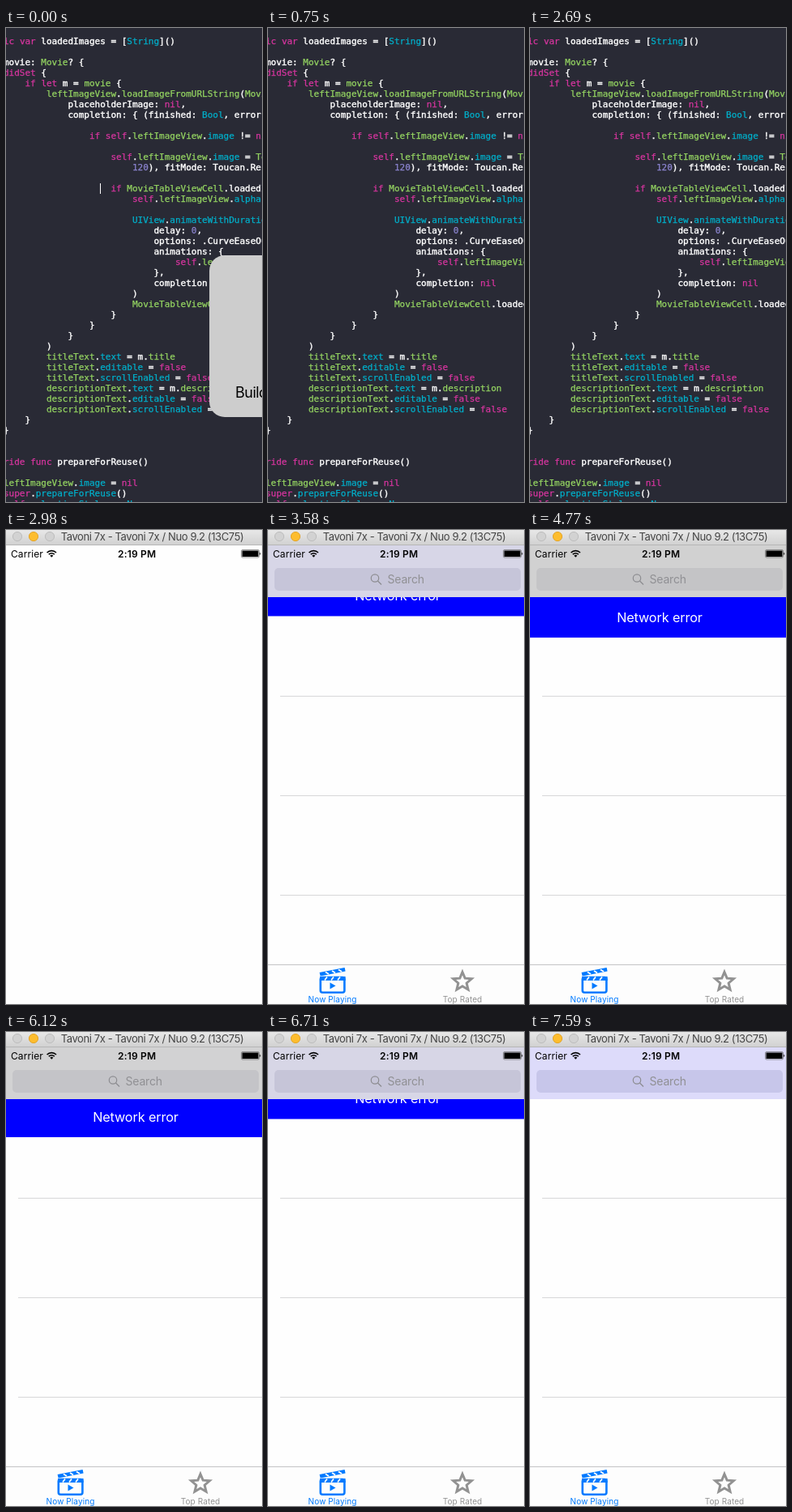
Write an HTML page that moves like this. It is 316x586 px and loops after 8 s.

```html
<!DOCTYPE html>
<html lang="en">
<head>
<meta charset="utf-8">
<title>Network error banner</title>
<style>
html, body { margin: 0; width: 100%; height: 100%; overflow: hidden; background: #292a35; }
#stage { position: relative; width: 316px; height: 586px; overflow: hidden; }
#stage > * { position: absolute; }
#code {
  left: -3px; top: 10px; margin: 0; color: #fff; white-space: pre;
  font: 11px/13px "DejaVu Sans Mono", monospace; -webkit-text-stroke: .4px;
}
#code span { -webkit-text-stroke: .25px; }
.key { color: #d7359f; }
.own { color: #95d562; }
.lib { color: #00afca; }
.num { color: #8b84cf; }
#cursor { left: 116px; top: 192px; width: 1px; height: 13px; background: #fff; }
#hud {
  left: 251px; top: 281px; width: 200px; height: 200px; border-radius: 19px; background: #cdcdcd;
  font: 18px/22px Inter, sans-serif; letter-spacing: -.5px; color: #000; text-align: center;
}
#hud span { position: absolute; left: 0; right: 0; top: 159px; }
#phone { left: 0; top: 0; font-family: Inter, sans-serif; }
</style>
</head>
<body>
<div id="stage">
  <pre id="code"></pre>
  <div id="cursor"></div>
  <div id="hud"><span>Build Succeeded</span></div>
  <svg id="phone" width="316" height="586" viewBox="0 0 316 586">
    <defs>
      <linearGradient id="chrome" x2="0" y2="1">
        <stop stop-color="#e8e8e8"/><stop offset="1" stop-color="#d0d0d0"/>
      </linearGradient>
    </defs>
    <rect width="316" height="586" fill="#fefefe"/>

    <g id="app">
      <path d="M15 205.5H316M15 328.5H316M15 451.5H316" stroke="#d7d7d9"/>
      <g id="banner">
        <rect y="83" width="316" height="50" fill="#00f"/>
        <text x="160" y="113.7" font-size="16.2" letter-spacing="-.1" text-anchor="middle" fill="#fff">Network error</text>
      </g>
      <rect id="bar" y="19" width="316" height="64"/>
      <rect id="field" x="8" y="47" width="304" height="28" rx="5"/>
      <g fill="none" stroke="#8c8c90" stroke-width="1.2">
        <circle cx="132" cy="59.5" r="4.7"/><path d="M135.5 63l4.5 4.5"/>
      </g>
      <text x="147.5" y="66" font-size="14" letter-spacing="-.2" fill="#909094">Search</text>

      <rect y="537" width="316" height="49" fill="#fdfdfd"/>
      <path d="M0 537.5H316" stroke="#c4c4c6"/>
      <g fill="#007aff">
        <rect x="64.8" y="553" width="29.6" height="18.8" rx="2.5" fill="none" stroke="#007aff" stroke-width="2.6"/>
        <path d="M64 552h31.6v5H64zM63.6 547l31-6 1 4.6-31 6zM76.5 559.5v8l7-4z"/>
        <path d="M71 546.5l4 2.6M79 545l4 2.6M87 543.4l4 2.6M73 552.5l-3 4M81 552.5l-3 4M89 552.5l-3 4" stroke="#fdfdfd" stroke-width="1.8"/>
        <text x="79.5" y="583.6" font-size="10" letter-spacing=".1" text-anchor="middle">Now Playing</text>
      </g>
      <path id="star" fill="none" stroke="#929292" stroke-width="3" stroke-miterlimit="8"/>
      <text x="240" y="583.6" font-size="10" letter-spacing=".1" text-anchor="middle" fill="#929292">Top Rated</text>
    </g>

    <rect width="316" height="19" fill="url(#chrome)"/>
    <path d="M0 18.5H316" stroke="#b6b6b6"/>
    <g stroke="#bdbdbd" fill="#d2d2d2">
      <circle cx="14" cy="8" r="5.6"/><circle cx="54" cy="8" r="5.6"/>
      <circle cx="34" cy="8" r="5.6" fill="#fdbd2e" stroke="#e2a52c"/>
    </g>
    <text x="180.5" y="13" font-size="13" letter-spacing="-.4" text-anchor="middle" fill="#444">Tavoni 7x - Tavoni 7x / Nuo 9.2 (13C75)</text>

    <text x="6" y="33.5" font-size="12" letter-spacing=".1">Carrier</text>
    <g fill="none" stroke="#000" stroke-width="1.7">
      <path d="M50.6 28a8 8 0 0 1 11.4 0M52.8 30.2a5 5 0 0 1 7 0"/>
      <path d="M56.3 33.8l-2-2.1a2.9 2.9 0 0 1 4 0z" fill="#000" stroke="none"/>
    </g>
    <text x="161.7" y="33.5" font-size="12" font-weight="600" letter-spacing=".2" text-anchor="middle">2:19 PM</text>
    <rect x="290.5" y="24.5" width="22" height="9.5" rx="1.5" fill="none" stroke="#666" stroke-width=".7"/>
    <path d="M291.5 25.5h20v7.5h-20zM313.3 27.5q2 1.8 0 3.6z"/>
  </svg>
</div>

<script>
const LOOP = 8000, TICK = 149;
const $ = id => document.getElementById(id);

// Each line: indent, then text.
const lines = `0 ic var loadedImages = [String]()

0 movie: Movie? {
0 didSet {
4 if let m = movie {
8 leftImageView.loadImageFromURLString(Movie
12 placeholderImage: nil,
12 completion: { (finished: Bool, error

16 if self.leftImageView.image != nil

20 self.leftImageView.image = Toucan
24 120), fitMode: Toucan.Resize

20 if MovieTableViewCell.loadedImages
24 self.leftImageView.alpha

24 UIView.animateWithDuration
28 delay: 0,
28 options: .CurveEaseOut
28 animations: {
32 self.leftImageView
28 },
28 completion: nil
24 )
24 MovieTableViewCell.loadedImages
20 }
16 }
12 }
8 )
8 titleText.text = m.title
8 titleText.editable = false
8 titleText.scrollEnabled = false
8 descriptionText.text = m.description
8 descriptionText.editable = false
8 descriptionText.scrollEnabled = false
4 }
0 }


0 ride func prepareForReuse()

0 leftImageView.image = nil
0 super.prepareForReuse()
0 self.selectionStyle = .None`;

const syntax = {
  key: /^(ic|var|didSet|if|let|self|nil|false|ride|func|super)$/,
  own: /^(Movie\w*|movie|leftImageView|loadImage\w+|Toucan|titleText|descriptionText|title|description)$/,
  lib: /^(String|Bool|image|alpha|UIView|animateWithDuration|text|editable|scrollEnabled|prepareForReuse|selectionStyle|None)$/,
  num: /^\d+$/
};

function paint(line) {
  const [, indent = 0, text = ''] = line.match(/^(\d+) (.*)$/) || [];
  const colored = text.replace(/(?<!func |fitMode: )\b\w+\b(?!:)/g, word => {
    const kind = Object.keys(syntax).find(k => syntax[k].test(word));
    return kind ? `<span class="${kind}">${word}</span>` : word;
  });
  return ' '.repeat(indent) + colored;
}
$('code').innerHTML = lines.split('\n').map(paint).join('\n');

$('star').setAttribute('d', 'M' + Array.from({ length: 10 }, (_, i) => {
  const r = i % 2 ? 5.4 : 12, a = i * Math.PI / 5;
  return [240 + r * Math.sin(a), 558.5 - r * Math.cos(a)].map(n => n.toFixed(2));
}).join('L') + 'Z');

// Steps are [tick, value, easing to the next step].
const animations = [];
function animate(id, prop, steps) {
  const all = [[0, steps[0][1]], ...steps, [LOOP / TICK, steps.at(-1)[1]]];
  const frames = all.map(([tick, value, easing = 'linear']) =>
    ({ offset: Math.min(1, tick * TICK / LOOP), [prop]: value, easing }));
  const a = $(id).animate(frames, { duration: LOOP, fill: 'both' });
  a.pause();
  animations.push(a);
}

const hold = 'step-end';
animate('cursor', 'opacity', [0, 3, 7, 11, 14, 18].map((tick, i) => [tick, 1 - i % 2, hold]));
animate('hud', 'opacity', [[2, 1], [5, 0]]);
animate('phone', 'opacity', [[0, 0, hold], [20, 1]]);
animate('app', 'opacity', [[20, 0], [23, 1]]);

const slide = (id, prop, away, shown) => animate(id, prop, [
  [20.2, away, 'ease-out'], [32, shown], [39, shown, 'ease-in-out'], [50.9, away]
]);
slide('banner', 'transform', 'translateY(-50px)', 'translateY(0px)');
slide('bar', 'fill', '#dddbfa', '#d1d1d1');
slide('field', 'fill', '#c7c6ea', '#c4c4c6');

const start = performance.now();
function render() {
  const time = (performance.now() - start) % LOOP;
  const tick = Math.floor((time + 12) / TICK);
  for (const a of animations) a.currentTime = tick * TICK;
  requestAnimationFrame(render);
}
render();
</script>
</body>
</html>
```
